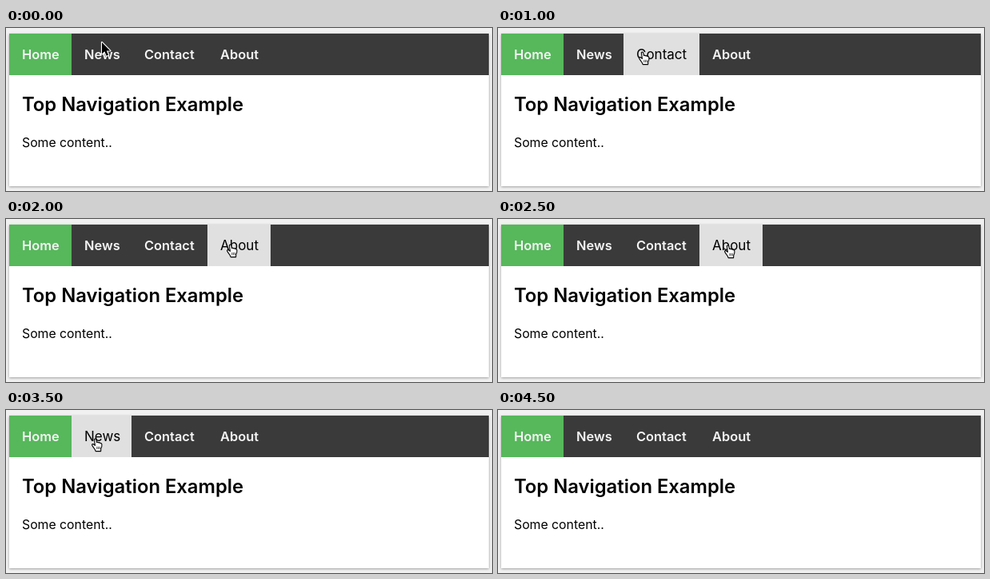
Animation of 608x204 px, one loop 5.5 s. Source, as an HTML page with a canvas:

```html
<!DOCTYPE html>
<html lang="en">
<head>
<meta charset="utf-8">
<title>Top Navigation Example</title>
<style>
  html, body { margin: 0; width: 100%; height: 100%; overflow: hidden; background: #f1f1f1; }
  canvas { display: block; width: 608px; height: 204px; }
</style>
</head>
<body>
<canvas id="stage" width="608" height="204"></canvas>
<script>
const ctx = document.getElementById('stage').getContext('2d');
const LOOP = 5500, STEP = 500;
const FAMILY = 'Inter, "Open Sans", sans-serif';

const links = [
  { label: 'Home', x: 4, w: 78 },
  { label: 'News', x: 82, w: 75 },
  { label: 'Contact', x: 157, w: 95 },
  { label: 'About', x: 252, w: 79 }
];

// One pose per half second; the pointer is absent after the last one.
const poses = [
  { cursor: 'arrow', x: 119, y: 17 },
  { cursor: 'hand', x: 112, y: 28, hover: 'News' },
  { cursor: 'hand', x: 176, y: 29, hover: 'Contact' },
  { cursor: 'hand', x: 183, y: 30, hover: 'Contact' },
  { cursor: 'hand', x: 276, y: 31, hover: 'About' },
  { cursor: 'hand', x: 283, y: 32, hover: 'About' },
  { cursor: 'hand', x: 214, y: 33, hover: 'Contact' },
  { cursor: 'hand', x: 107, y: 35, hover: 'News' },
  { cursor: 'hand', x: 102, y: 26, hover: 'News' }
];

const arrow = new Path2D('M1 1 V15.5 L4.3 12.3 L6.7 17.8 L9.1 16.8 L6.8 11.5 H11.4 Z');
const hand = new Path2D(
  'M3.4 1.8 Q4.6 .2 5.6 1.8 L6.6 5.6 Q7.8 4.6 8.7 5.9 Q10 5.2 10.8 6.6 ' +
  'Q12.6 6.2 12.9 8.2 Q13.2 11 11.8 13.4 L11.6 16.6 H5.2 Q4.6 14.4 2.8 12.4 ' +
  'L.8 9.4 Q.2 7.8 1.6 7.6 Q3 7.8 4.4 9.4 Z');
const creases = new Path2D('M6.8 10.8 V14 M8.6 10.8 V14 M10.4 10.8 V14');

function rect(color, x, y, w, h) {
  ctx.fillStyle = color;
  ctx.fillRect(x, y, w, h);
}

function text(str, x, y, size, weight, color) {
  ctx.font = `${weight} ${size}px ${FAMILY}`;
  ctx.fillStyle = color;
  ctx.fillText(str, x, y);
}

function drawCard() {
  rect('#f1f1f1', 0, 0, 608, 204);
  ctx.save();
  ctx.shadowColor = 'rgba(0,0,0,.35)';
  ctx.shadowBlur = 3;
  ctx.shadowOffsetY = 1;
  rect('#fff', 4, 7, 600, 191);
  ctx.restore();
  text('Top Navigation Example', 20, 104, 23.8, 600, '#000');
  text('Some content..', 20, 149, 15.8, 400, '#000');
}

function drawNav(hover) {
  rect('#3a3a3a', 4, 7, 600, 52);
  for (const { label, x, w } of links) {
    const hovered = label === hover;
    if (label === 'Home') rect('#56b85b', x, 7, w, 52);
    if (hovered) rect('#e0e0e0', x, 7, w, 52);
    if (hovered) text(label, x + 16, 39, 17, 400, '#000');
    else text(label, x + 16, 39, 16.4, 600, '#f4f4f4');
  }
}

function drawCursor({ cursor, x, y }) {
  const isArrow = cursor === 'arrow';
  const shape = isArrow ? arrow : hand;
  ctx.save();
  ctx.translate(x, y);
  ctx.lineJoin = 'round';
  ctx.lineWidth = isArrow ? 2.2 : 1.1;
  ctx.strokeStyle = isArrow ? '#fff' : '#000';
  ctx.fillStyle = isArrow ? '#000' : '#fff';
  if (isArrow) {
    ctx.stroke(shape);
    ctx.fill(shape);
  } else {
    ctx.fill(shape);
    ctx.stroke(shape);
    ctx.lineWidth = 0.7;
    ctx.stroke(creases);
  }
  ctx.restore();
}

function draw() {
  const pose = poses[Math.floor(performance.now() % LOOP / STEP)];
  drawCard();
  drawNav(pose && pose.hover);
  if (pose) drawCursor(pose);
  requestAnimationFrame(draw);
}
draw();
</script>
</body>
</html>
```
